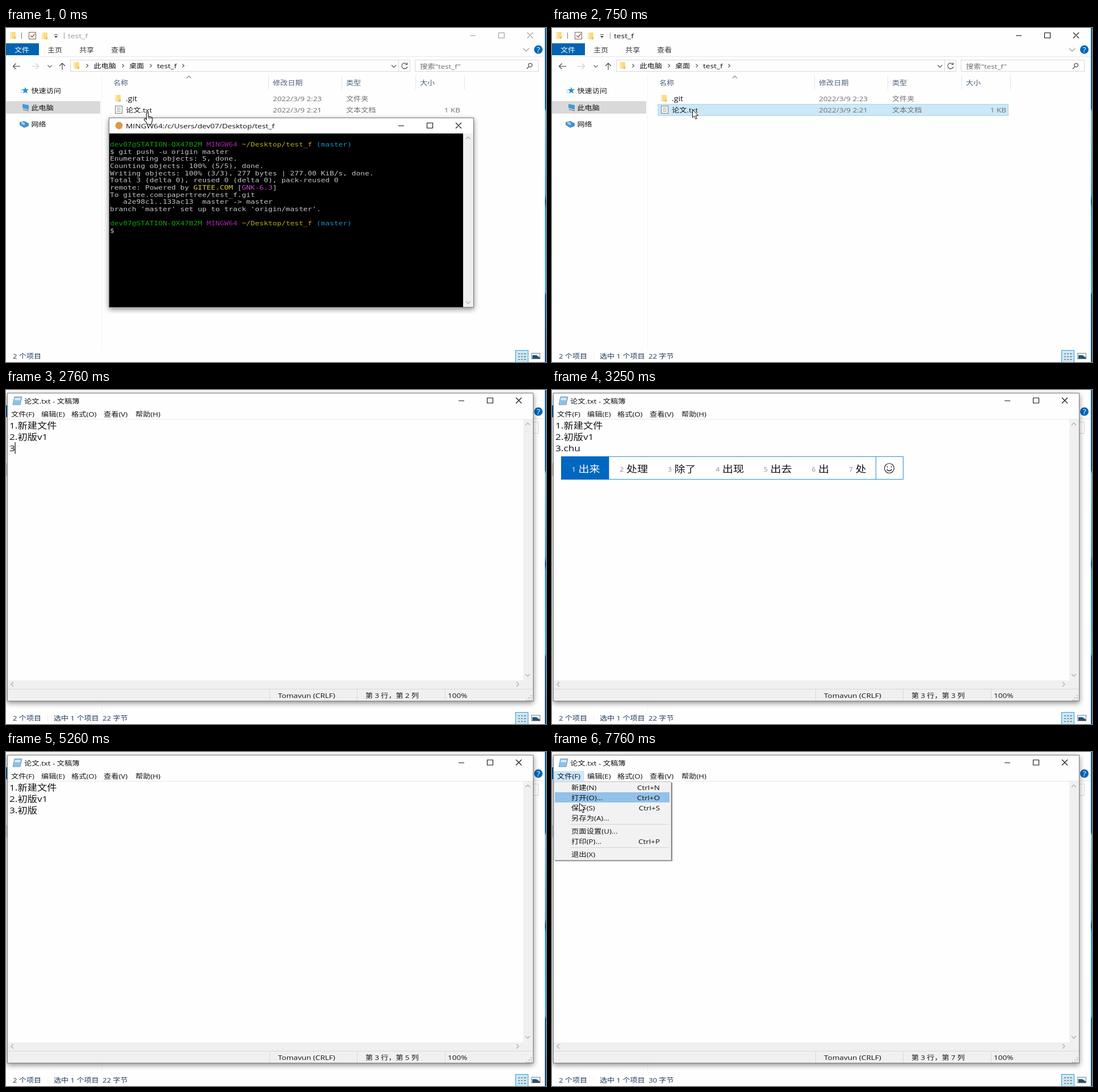
An HTML page that plays this animation: 951 by 589 pixels, repeating every 8000 ms.

```html
<!DOCTYPE html>
<html lang="zh-CN">
<head>
<meta charset="utf-8">
<title>test_f</title>
<style>
  html, body { margin: 0; width: 100%; height: 100%; overflow: hidden; background: #fefefe; }
  svg { display: block; width: 951px; height: 589px; }
  text { font-family: "Open Sans", "Noto Sans CJK SC", "Noto Sans CJK", sans-serif; white-space: pre; }
  .mono text { font-family: "DejaVu Sans Mono", monospace; }
  .shadow { filter: drop-shadow(0 3px 5px #0007); }
</style>
</head>
<body>
<svg id="stage" viewBox="0 0 951 589">
  <defs>
    <linearGradient id="edge" x2="0" y2="1">
      <stop stop-color="#0f5c92"/><stop offset=".24" stop-color="#0f5c92"/>
      <stop offset=".25" stop-color="#7cc0dc"/><stop offset=".5" stop-color="#4f9fc8"/>
      <stop offset=".52" stop-color="#0c4f86"/><stop offset=".54" stop-color="#2f9bd0"/>
      <stop offset=".79" stop-color="#4aaedb"/><stop offset=".8" stop-color="#0d568e"/>
      <stop offset="1" stop-color="#0d4a7c"/>
    </linearGradient>
  </defs>
</svg>
<script>
const ASPECT = 1.19; // the screen is shown wider than tall
const stage = document.getElementById('stage');
const $ = id => document.getElementById(id);

const text = (x, y, str, fill = '#111', size = 11, anchor = 'start') =>
  `<text transform="matrix(${ASPECT} 0 0 1 ${x} ${y})" font-size="${size}" fill="${fill}" text-anchor="${anchor}">${str}</text>`;
const rect = (x, y, w, h, fill = 'none', stroke = 'none', extra = '') =>
  `<rect x="${x}" y="${y}" width="${w}" height="${h}" fill="${fill}" stroke="${stroke}" ${extra}/>`;
const line = (d, stroke = '#444', w = 1) => `<path d="${d}" fill="none" stroke="${stroke}" stroke-width="${w}"/>`;
const group = (id, body, extra = '') => `<g id="${id}" ${extra}>${body}</g>`;
const chevron = (x, y, turn, color = '#555', s = 4) =>
  `<path transform="translate(${x} ${y}) rotate(${turn})" d="M${-s} ${s / 2}L0 ${-s / 2}L${s} ${s / 2}" fill="none" stroke="${color}" stroke-width="1.2"/>`;
const buttons = (x, y, color) => // minimise, maximise, close
  line(`M${x - 5} ${y + .5}h10M${x + 45.5} ${y - 4.5}h10v9h-10zM${x + 96} ${y - 5}l10 10m0 -10l-10 10`, color, 1.1);
const folder = (x, y, h = 12) =>
  rect(x, y, 10, h, '#f9dc86') + rect(x, y, 3, h, '#fdeab0') + rect(x + 7, y + h - 4, 3, 4, '#e9bf57');

function explorer() {
  const gray = '#6d6d6d', head = '#4c607a', out = [];
  out.push(
    folder(7, 7), line('M27.5 8v11', '#777'),
    rect(40.5, 7.5, 12, 12, '#fff', '#666'), line('M43 13l3 3 5 -6', '#b5651d', 1.6),
    folder(63, 8), line('M85 11.5h6', '#444'), '<path d="M85 14h6l-3 3.5z" fill="#444"/>',
    line('M102.5 8v11', '#999'),
    group('winBar', text(109, 18, 'test_f', 'currentColor', 11.6) + buttons(822, 13, 'currentColor')),
    rect(0, 27, 58, 21, '#0063b1'), text(15, 42.5, '文件', '#fff'));
  [[73, '主页'], [129, '共享'], [185, '查看']].forEach(([x, s]) => out.push(text(x, 42.5, s, '#333')));
  out.push(
    line('M0 50.5H949', '#e6e6e6'), chevron(916, 38.5, 180, '#999', 5),
    '<circle cx="937.5" cy="38" r="7.5" fill="#0067b8"/>', text(937.5, 42.5, '?', '#fff', 12, 'middle'),
    line('M25 67.5H12.5m5 -5l-5 5 5 5', '#444', 1.2), line('M45 67.5h12.5m-5 -5l5 5 -5 5', '#ccc', 1.2),
    chevron(77, 67.5, 180, '#666', 3.5), line('M99 73.500V62m-5 5l5 -5 5 5', '#444', 1.2),
    rect(113.5, 56.500, 598, 20, '#fefefe', '#d9d9d9'), folder(119, 60),
    chevron(683, 67.5, 180, '#555'), line('M691.5 57v20', '#d9d9d9'),
    line('M706 64a5 5 0 1 0 .8 4M706.5 61v3.500h-3.500', '#555', 1.2),
    rect(720.5, 56.5, 217, 20, '#fefefe', '#d9d9d9'), text(729, 71.5, '搜索"test_f"', gray, 11.2),
    line('M917 72l3.500 -3.500M926.500 65.500a3.200 3.200 0 1 0 -6.400 0a3.200 3.200 0 1 0 6.400 0', '#555', 1.3));
  [143, 206, 255, 312].forEach(x => out.push(chevron(x, 66.5, 90, '#555', 3)));
  out.push(text(154.5, 71, '此电脑'), text(217, 71, '桌面'), text(266, 71, 'test_f', '#111', 11.5));

  out.push(
    line('M168.500 83V565', '#f3f3f3'), rect(0, 129, 166, 22, '#d9d9d9'),
    '<path d="M34 104l1.600 4h4.400l-3.400 3 1.400 4.500 -4 -2.600 -4 2.600 1.300 -4.500 -3.400 -3h4.500z" fill="#2f8fd3"/>',
    line('M25 110h4M25.500 113.500h3.500', '#8cc3ea'),
    '<path d="M29 134l11 2v8l-11 -3z" fill="#3f9bd8"/>', line('M30 143.500l10 2.500', '#888', 1.4),
    '<path d="M24 166l8 -2 8 4v5l-8 3 -8 -5z" fill="#4a90c4"/><path d="M27 165l6 2v5l-6 -3z" fill="#9ad0f2"/>',
    text(44.5, 114.5, '快速访问'), text(44.5, 144.5, '此电脑'), text(44.5, 174, '网络'));

  [[189, '名称'], [470, '修改日期'], [599, '类型'], [729, '大小']].forEach(([x, s]) => out.push(text(x, 100.5, s, head)));
  [463, 592, 722, 808].forEach(x => out.push(line(`M${x - .5} 83v26`, '#e6e6e6')));
  out.push(
    chevron(322, 86.5, 0, '#888'),
    rect(186.5, 134.500, 617, 20, 'none', 'none', 'id="row"'),
    folder(192, 118), rect(192.500, 137.500, 12, 13, '#fff', '#777'), line('M195 141h7m-7 3h7m-7 3h7', '#888'),
    text(211, 129, '.git', '#111', 11.8), text(211, 149, '论文.txt', '#111', 11.1),
    text(470, 129, '2022/3/9 2:23', gray, 11.3), text(470, 149, '2022/3/9 2:21', gray, 11.3),
    text(599, 129, '文件夹', gray), text(599, 149, '文本文档', gray),
    text(800, 149, '1 KB', gray, 11.3, 'end'));
  return out.join('');
}

const statusBar = () =>
  text(12, 583, '2 个项目', '#1e395b') + group('picked', '') +
  rect(897.5, 568.5, 22, 22, '#cbe8f6', '#26a0da') +
  line('M902 574.500h3m2 0h3m2 0h4M902 579.500h3m2 0h3m2 0h4M902 584.500h3m2 0h3m2 0h4', '#777', 1.6) +
  rect(925.5, 573.500, 15, 10, '#dff0fa', '#888') + '<path d="M927 577h7l6 4v2h-13z" fill="#27506f"/>';

function terminal() {
  const c = { g: '#13a10e', m: '#a424ab', y: '#b5ad1c', b: '#1c8fc2', w: '#c4c4c4', Y: '#e0cf22', M: '#c845cf' };
  const prompt = 'g:dev07@STATION-QX47B2M |m:MINGW64 |y:~/Desktop/test_f |b:(master)';
  const rows = [
    prompt, 'w:$ git push -u origin master', 'w:Enumerating objects: 5, done.',
    'w:Counting objects: 100% (5/5), done.', 'w:Writing objects: 100% (3/3), 277 bytes ¦ 277.00 KiB/s, done.',
    'w:Total 3 (delta 0), reused 0 (delta 0), pack-reused 0',
    'w:remote: Powered by |Y:GITEE.COM |w:[|M:GNK-6.3|w:]', 'w:To gitee.com:papertree/test_f.git',
    'w:   a2e98c1..133ac13  master -&gt; master', "w:branch 'master' set up to track 'origin/master'.",
    '', prompt, 'w:$'];
  const span = s => `<tspan fill="${c[s[0]]}">${s.slice(2).replace('¦', '|')}</tspan>`;
  const body = rows.map((r, i) => r && text(183, 209 + i * 12.66, r.split('|').map(span).join(''), c.w, 10.82)).join('');
  return rect(181.5, 158.5, 642, 334, '#fff', '#777', 'class="shadow"') +
    '<circle cx="199" cy="172" r="6.500" fill="#d79a4a"/>' +
    text(211, 176.5, 'MINGW64:/c/Users/dev07/Desktop/test_f', '#111', 11.5) + buttons(696, 172, '#111') +
    rect(182, 186, 623, 306, '#000') + rect(805, 186, 18, 306, '#f0f0f0') +
    chevron(814, 194, 0, '#aaa') + chevron(814, 484, 180, '#aaa') + `<g class="mono">${body}</g>`;
}

// the editor window as it fades in
const opening = () =>
  rect(0, 0, 951, 528, '#fefefe', 'none', 'opacity=".89"') +
  rect(0, 528, 951, 36, '#f1f2f2', 'none', 'class="shadow"') + rect(0, 528, 951, 15, '#eee') +
  line('M0 564.500H951', '#8a8a8a') + line('M0 543.5H951M487.500 544v19M732.500 544v19', '#dcdcdc') +
  text(501, 558, 'Tomavun (CRLF)', '#111', 11.4) + text(746, 558, '第 1 行，第 1 列');

function notepad() {
  const menus = [[9, '文件(F)'], [62, '编辑(E)'], [115, '格式(O)'], [172, '查看(V)'], [228, '帮助(H)']];
  const grip = [[925, 539], [925, 543], [921, 543], [925, 547], [921, 547], [917, 547]];
  return rect(2.5, 5.5, 926, 543, '#fefefe', '#7d7d7d', 'class="shadow"') +
    '<path d="M15 12h13l-3 14h-13z" fill="#8fc1e6" stroke="#6a8ba5" stroke-width=".8"/><path d="M16 14h10l-1 4h-10z" fill="#d4ebfa"/>' +
    text(32, 23.5, '论文.txt - 文稿簿', '#111', 11.2) + buttons(802, 18.5, '#111') +
    rect(3.5, 34.5, 52, 17, '#cce8ff', '#b5dcf8', 'id="fileTab"') +
    menus.map(([x, s]) => text(x, 46.5, s, '#111', 11.1)).join('') + line('M3 51.5H928', '#e8e8e8') +
    rect(911, 52, 17, 460, '#f0f0f0') + rect(3, 512, 925, 36, '#f0f0f0') +
    chevron(919, 60, 0, '#aaa') + chevron(919, 503, 180, '#aaa') + chevron(11, 519, -90, '#aaa') + chevron(901, 519, 90, '#aaa') +
    line('M3 527.5H928M464.5 528v20M618.5 528v20M773.5 528v20', '#d7d7d7') +
    text(479, 543, 'Tomavun (CRLF)', '#111', 11.4) + group('place', '') + text(778, 543, '100%', '#111', 11.4) +
    grip.map(([x, y]) => rect(x - 1, y - 1, 2, 2, '#bbb')).join('') +
    text(6, 67.5, '1.新建文件', '#111', 14.5) + text(6, 87.5, '2.初版v1', '#111', 14.5) + group('typed', '') +
    rect(0, 92, 1.2, 20.5, '#111', 'none', 'id="caret"') + group('ime', '') + group('menu', fileMenu());
}

function fileMenu() {
  const items = [
    [67, '新建(N)', 'Ctrl+N'], [85, '打开(O)...', 'Ctrl+O'], [103, '保存(S)', 'Ctrl+S'], [121, '另存为(A)...', ''],
    [144, '页面设置(U)...', ''], [161.5, '打印(P)...', 'Ctrl+P'], [185, '退出(X)', '']];
  return rect(5, 54, 207, 138.500, '#8a8a8a') + rect(3.5, 52.5, 206, 138, '#f2f2f2', '#ccc') +
    line('M32 127.500H206M32 168.500H206', '#d4d4d4') + rect(5, 71, 202, 18, '#92c1e9', 'none', 'id="hot"') +
    group('items', items.map(([y, s, key]) =>
      text(34, y, s, '#111', 11.2) + text(190, y, key, '#111', 11.3, 'end')).join(''));
}

// candidate bar of the input method; a hint adds a second row
function candidates({ x, words, hint, width }) {
  const y = 117.5, h = 40, first = 46.5 + 19 * words[0].length;
  let at = x + .5, cells = '';
  words.forEach((w, i) => {
    cells += text(at + 18.5, 144, i + 1, i ? '#888' : '#fff', 10) + text(at + 30, 145, w, i ? '#111' : '#fff', 16);
    at += 46.5 + 19 * w.length;
  });
  const end = width ? x + width - 48.500 : at;
  const face = `<circle cx="${end + 24}" cy="138" r="8.500" fill="none" stroke="#222" stroke-width="1.2"/>` +
    line(`M${end + 19.5} 140q4.500 5 9 0M${end + 20.500} 134.500v2M${end + 27.500} 134.500v2`, '#222', 1.5);
  return rect(x + .5, y, end + 48 - x, hint ? 81 : h, '#fff', '#2b93cd') + rect(x, y - .5, first, h + 1, '#0067c0') +
    line(`M${end + .5} ${y}v${h}`, '#2b93cd') + cells + face +
    (hint ? line(`M${x} ${y + h + .5}H${end + 48}`, '#2b93cd') + text(x + 18, 184, hint, '#666', 13) : '');
}

const cursors = {
  hand: '<path d="M-1.700 1.500Q0 -1 1.700 1.500V7L7.500 8.300Q9.300 9 9.100 11.500L8 16.500 7 21H-.500L-1.500 18 -5.500 13Q-6 10.500 -3.500 10.800L-1.700 12.500Z" fill="#fff" stroke="#111" stroke-width="1.1"/>' + line('M1.700 7v4M4.300 8v3.500M6.800 8.500v3', '#111', .9),
  arrow: '<path d="M0 0V14L3.300 11 5.500 16.500 7.800 15.500 5.600 10.300H10Z" fill="#fff" stroke="#111"/>',
  ring: '<circle r="7.800" fill="none" stroke="#2f9be0" stroke-width="4"/>' + line('M0 -7.800A7.800 7.800 0 0 1 7.800 0', '#9fd8f7', 3),
  beam: line('M-2.500 .500h6M-2.500 12.500h6', '#111', 1.4)
};

stage.insertAdjacentHTML('beforeend',
  rect(0, 0, 951, 589, '#fefefe') + explorer() + rect(949, 0, 2, 589, 'url(#edge)') + statusBar() +
  group('terminal', terminal()) + group('opening', opening()) + group('notepad', notepad()) + group('cursor', ''));

// each step changes only what it names
const steps = [
  [0, { cursor: ['hand', 249, 149], terminal: 1, bytes: 0, row: 'none', opening: 0, notepad: 0,
    typed: '', caret: 0, col: 1, ime: null, menu: 0, items: .35 }],
  [260, { cursor: ['hand', 246, 145] }],
  [510, { cursor: ['arrow', 247.5, 144], row: '#e5f3ff' }],
  [750, { terminal: 0, row: '#cce8f7', bytes: 22 }],
  [1010, { cursor: ['arrow', 247.5, 138] }],
  [1260, { cursor: ['arrow', 258.500, 136.500] }],
  [1510, { cursor: ['arrow', 261.500, 138.500] }],
  [1760, { cursor: ['ring', 262, 142] }],
  [2010, { cursor: ['beam', 262.500, 135.500], opening: 1 }],
  [2260, { cursor: null, opening: 0, notepad: 1, caret: 6 }],
  [2530, { caret: 0 }],
  [2760, { typed: '3', caret: 15.5, col: 2 }],
  [3010, { typed: '3.ch', caret: 0, col: 3, ime: { x: 16, words: ['出', '吃', '成', '车', '长', '场', '超'] } }],
  [3250, { typed: '3.chu', ime: { x: 16, words: ['出来', '处理', '除了', '出现', '出去', '出', '处'] } }],
  [3500, { typed: "3.chu'ban", ime: { x: 16, words: ['出版', '初版', '出班', '出办', '出', '处', '除'] } }],
  [4010, { caret: 85 }],
  [4510, { caret: 0 }],
  [4760, { typed: '3.初版', caret: 55, col: 5, ime: null }],
  [5260, { caret: 0 }],
  [5750, { typed: '3.初版v', ime: { x: 51, words: ['v'], width: 674, hint: '数字 v123　日期 v2022.3.9　算式 v1+2' } }],
  [6260, { typed: '3.初版v2', caret: 74.5, col: 7, ime: null }],
  [7260, { cursor: ['arrow', 45, 62], caret: 0, bytes: 30, menu: 1 }],
  [7520, { cursor: ['arrow', 48, 81.500], items: 1 }],
  [7760, { cursor: ['arrow', 48.5, 90.500] }]
];

const show = (id, on) => $(id).style.display = on ? '' : 'none';

function draw(s) {
  ['terminal', 'opening', 'notepad', 'menu', 'caret'].forEach(id => show(id, s[id]));
  show('fileTab', s.menu);
  show('hot', s.items === 1);
  $('items').style.opacity = s.items;
  $('winBar').style.color = s.terminal ? '#999' : '#111';
  $('row').setAttribute('fill', s.row);
  $('row').setAttribute('stroke', s.bytes ? '#a3d3ee' : s.row);
  $('picked').innerHTML = s.bytes
    ? line('M73.500 573v11', '#f0f0f0') + text(84, 583, '选中 1 个项目', '#1e395b') + text(170, 583, s.bytes + ' 字节', '#1e395b') : '';
  $('typed').innerHTML = text(6, 107.5, s.typed, '#111', 14.5);
  $('caret').setAttribute('x', s.caret);
  $('place').innerHTML = text(633, 543, `第 3 行，第 ${s.col} 列`);
  $('ime').innerHTML = s.ime ? candidates(s.ime) : '';
  const [kind, x, y] = s.cursor || [];
  $('cursor').innerHTML = kind ? `<g transform="translate(${x} ${y})">${cursors[kind]}</g>` : '';
}

let shown = -1;
function tick() {
  const t = performance.now() % 8000;
  const count = steps.filter(([at]) => at <= t).length;
  if (count !== shown) {
    shown = count;
    draw(Object.assign({}, ...steps.slice(0, count).map(([, change]) => change)));
  }
  requestAnimationFrame(tick);
}
tick();
</script>
</body>
</html>
```
